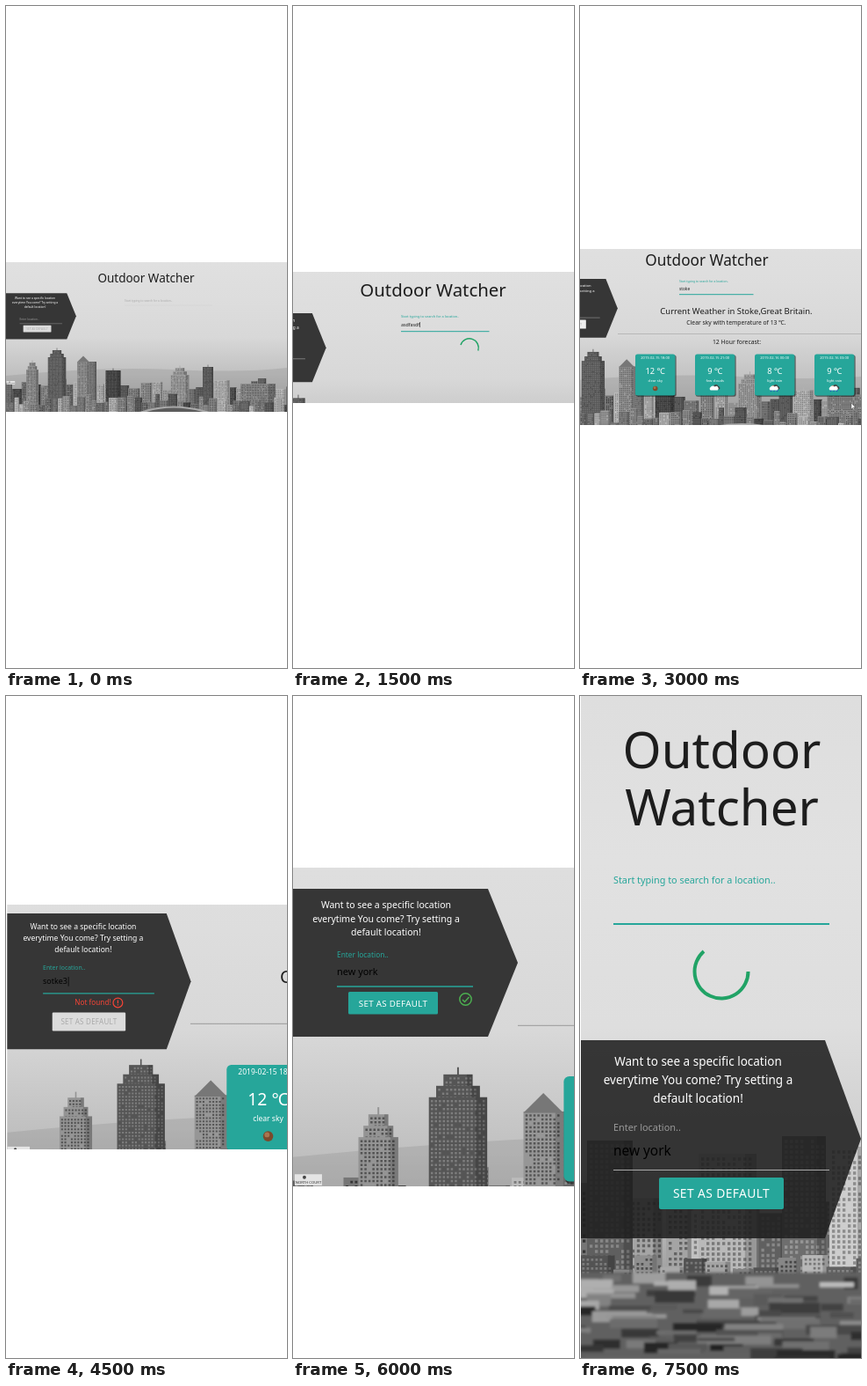
Recreate the animation shown at these times as an HTML page. Size 320 by 752 pixels, loop 9 s.

```html
<!DOCTYPE html>
<html lang="en">
<head>
<meta charset="utf-8">
<title>Outdoor Watcher</title>
<style>
  html, body { margin: 0; width: 100%; height: 100%; overflow: hidden; background: #fff; }
  #stage { display: block; width: 320px; height: 752px; font-family: "Noto Sans", "Open Sans", sans-serif; }
  .scene { opacity: 0; animation: show 9s step-end infinite; animation-delay: calc(var(--i) * 1.5s); }
  @keyframes show {
    0% { opacity: 1; }
    16.66667%, 100% { opacity: 0; }
  }
</style>
</head>
<body>
<svg id="stage" viewBox="0 0 320 752"></svg>
<script>
const TEAL = '#26a69a', GREEN = '#21a366', INK = '#1d1d1d';

let seed = 11;
const random = (min = 0, max = 1) => min + (max - min) * (seed = seed * 16807 % 2147483647) / 2147483647;

const rect = (x, y, w, h, fill, extra = '') =>
  `<rect x="${x}" y="${y}" width="${w}" height="${h}" fill="${fill}" ${extra}/>`;
const line = (x1, x2, y, color, width = 1) =>
  `<path d="M${x1} ${y}H${x2}" stroke="${color}" stroke-width="${width}"/>`;
const text = (x, y, size, fill, str, anchor = 'start', extra = '') =>
  `<text x="${x}" y="${y}" font-size="${size}" fill="${fill}" text-anchor="${anchor}" ${extra}>${str}</text>`;
const centered = (x, y, size, fill, str, extra) => text(x, y, size, fill, str, 'middle', extra);
const stroke = (d, color, width) =>
  `<path d="${d}" fill="none" stroke="${color}" stroke-width="${width}"/>`;
const ring = (x, y, r, color) =>
  `<circle cx="${x}" cy="${y}" r="${r}" fill="none" stroke="${color}" stroke-width="1.5"/>`;
const place = (x, y, scale, body) => `<g transform="translate(${x} ${y}) scale(${scale})">${body}</g>`;
const grey = v => `rgb(${v | 0},${v | 0},${v | 0})`;

// A block with rows of windows; unit is the window spacing.
function building(x, w, top, bottom, shade, unit) {
  let windows = '';
  for (let y = top + unit; y < bottom; y += unit)
    for (let wx = x + unit * .5; wx < x + w - unit * .6; wx += unit)
      if (random() < .85) windows += `M${wx.toFixed(2)} ${y.toFixed(2)}h${(unit * .55).toFixed(2)}`;
  const tone = shade > 115 ? shade - 65 : shade + 40;
  return rect(x, top, w, bottom - top, grey(shade)) +
    stroke(windows, grey(tone), unit * .55) +
    rect(x + w * .8, top, w * .2, bottom - top, '#000', 'opacity=".18"');
}

// Stepped tower: each tier is lower and wider than the one above it.
function tower(center, width, top, shade, tiers = 3) {
  let body = rect(center - .3, top - 2.5, .6, 3, grey(shade));
  for (let i = 0; i < tiers; i++) {
    const w = width * (i + 2) / (tiers + 1);
    body += building(center - w / 2, w, top + i * 4, 461, shade, 1.4);
  }
  return body;
}

function row(from, to, minWidth, maxWidth, minTop, maxTop, bottom, unit) {
  let body = '';
  for (let x = from; x < to;) {
    const w = random(minWidth, maxWidth);
    body += building(x, w, random(minTop, maxTop), bottom, random(50, 195), unit);
    x += w * random(.9, 1.15);
  }
  return body;
}

function skyline() {
  return rect(0, 280, 320, 181, 'url(#sky)') +
    '<path d="M0 420Q110 409 190 413T320 411V461H0Z" fill="#999" opacity=".4"/>' +
    row(0, 320, 7, 14, 422, 436, 461, 1.6) +
    tower(30, 14, 405, 148) + tower(58, 20.5, 391, 85) +
    building(92, 11, 404, 461, 105, 1.4) + building(81, 14, 404, 461, 150, 1.4) +
    '<path d="M81 404.500L88 397.500 95 404.500Z" fill="#777"/>' +
    tower(122, 17, 414, 60, 1) + tower(198, 21, 411, 160) + tower(230, 12, 410, 80, 1) +
    tower(246, 18, 425, 180, 1) + building(267, 40, 429, 461, 140, 1.5) +
    row(0, 320, 4, 11, 440, 455, 461, 1.6) +
    '<path d="M152 461Q190 448 232 461Z" fill="#aaa"/><path d="M160 461Q190 452 224 461Z" fill="#5c5c5c"/>' +
    rect(.6, 426, 9.6, 3.9, '#e4e4e4') + '<circle cx="4" cy="427.1" r=".6" fill="#444"/>' +
    centered(5.4, 429.4, 1.3, '#333', 'NORTH COURT');
}

const city = (scale, x, y) =>
  `<use href="#city" transform="translate(${x} ${y}) scale(${scale})"/>`;

const prompt = (x, y, leading, size) =>
  ['Want to see a specific location', 'everytime You come? Try setting a', 'default location!']
    .map((s, i) => centered(x, y + i * leading, size, '#fff', s)).join('');

// shift makes room for a message between the input and the button.
function panel({ value = '', accent = '#999', button = '#dcdcdc', caption = '#aaa', shift = 0, extra = '' }) {
  const bottom = 387 + shift;
  return `<path d="M-200 219H222L256 ${(219 + bottom) / 2} 222 ${bottom}H-200Z" fill="#363636"/>` +
    prompt(106, 241, 15.6, 10.5) +
    (value ? text(50, 297, 8.35, accent, 'Enter location..') + text(50, 317, 10.95, '#000', value)
           : text(50, 319, 10, '#999', 'Enter location..')) +
    line(50, 205, 330, accent, 1.5) +
    rect(63, 336 + shift, 102, 25.5, button, 'rx="1.5"') +
    centered(114, 352.5 + shift, 9.8, caption, 'SET AS DEFAULT', 'letter-spacing=".3"') + extra;
}

function icon(sky) {
  if (sky === 'clear sky')
    return '<circle cy="39" r="2.8" fill="#7b4a2c"/><circle cx="-.6" cy="38.2" r="1.4" fill="#a87550"/>';
  const rain = '<path d="M-3.500 40.500l-1 2M0 40.500l-1 2M3.500 40.500l-1 2" stroke="#2456b8" stroke-width="1.2"/>' +
    '<circle cx="-2" cy="37" r="1.6" fill="#d9642c"/>';
  return '<path d="M-2 40a2.500 2.500 0 0 1 1-4.500a3 3 0 0 1 5 1a2 2 0 0 1 1 3.500z" fill="#444"/>' +
    (sky === 'light rain' ? rain : '') +
    '<path d="M-5 41a2 2 0 0 1 0-3.500a3 3 0 0 1 5-.5a2.200 2.200 0 0 1 3 4z" fill="#fff"/>';
}

const card = (x, y, scale, date, temp, sky) => place(x, y, scale,
  rect(-22, 1, 46, 47.3, '#000', 'rx="2.5" opacity=".5"') +
  rect(-22.7, 0, 45.4, 47, TEAL, 'rx="2.5"') +
  centered(0, 5.5, 4.1, '#fff', `2019-02-${date}:00`) +
  centered(0, 22, 9.3, '#fff', temp + ' ℃') +
  centered(0, 31, 4.1, '#fff', sky) + icon(sky));

const firstCard = (x, y, scale) => card(x, y, scale, '15 18', 12, 'clear sky');
const title = (x, y, size) => centered(x, y, size, INK, 'Outdoor Watcher');
const search = (x, y, size, color) => text(x, y, size, color, 'Start typing to search for a location..');
const summary = (x, y, size, anchor) => text(x, y, size, INK, 'Current Weather in Stoke,Great Britain.', anchor);

function home() {
  return city(1, 0, 0) + title(159.5, 314, 13.5) + search(135, 336, 3.2, '#aaa') +
    line(135, 235, 340, '#ccc', .5) + place(0, 257.8, .312, panel({}));
}

function searching() {
  return city(1.51, -81.6, -145) + title(159.5, 330, 20.4) + search(123, 353.5, 3.9, TEAL) +
    text(123, 364, 5.3, INK, 'asdfasdf') + rect(144.3, 359, .6, 6, INK) + line(123, 223.5, 369.7, TEAL) +
    stroke('M191 385A10.300 10.300 0 0 1 210.800 391.500', GREEN, 1.5) +
    place(-81.6, 247, .466, panel({ button: '#eee' })) +
    stroke('M0 451Q4 448 8 451', '#666', 1);
}

function forecast() {
  const later = [['15 21', 9, 'few clouds'], ['16 00', 8, 'light rain'], ['16 03', 9, 'light rain']];
  return city(1.275, -59, -105.6) + title(144.5, 294.5, 17.2) + search(113, 314.3, 3.3, TEAL) +
    text(113, 323, 4.75, INK, 'stoke') + line(113, 197.5, 327.7, TEAL) +
    summary(178, 349.5, 9.46, 'middle') +
    centered(178, 362, 6.74, INK, 'Clear sky with temperature of 13 ℃.') +
    line(43, 320, 372.5, '#aaa', .7) +
    centered(178.5, 383.5, 6.8, INK, '12 Hour forecast:') +
    firstCard(85.7, 395.5, 1) +
    later.map((entry, i) => card(153.7 + i * 68, 395.5, 1, ...entry)).join('') +
    place(-58.5, 223.4, .396, panel({ button: '#eee' })) +
    '<path d="M309 451v7l1.500-1.500 1.200 2.500 1-.5-1.200-2.500h2z" fill="#fff" stroke="#333" stroke-width=".4"/>';
}

function notFound() {
  const red = '#f44336';
  const error = centered(119.5, 346, 10, red, 'Not found!') + ring(154.3, 343, 6.6, red) +
    stroke('M154.300 339.500v4.500m0 1.300v1.400', red, 1.5) + rect(85, 307, .9, 13, '#000');
  return city(2.65, 0, -617) + line(210, 320, 372.3, '#999') + summary(312, 326, 19.7) +
    firstCard(298.5, 419, 2.08) +
    place(1.2, 67.9, .818, panel({ value: 'sotke3', accent: TEAL, shift: 20.5, extra: error })) +
    rect(0, 237, 1.3, 278, '#fff');
}

function accepted() {
  const check = ring(196.5, 344.5, 6.7, '#4caf50') + stroke('M193 345l2.500 2.500 5-5.500', '#4caf50', 1.5);
  return city(3.24, 0, -837) + line(256, 320, 374.3, '#999') + firstCard(366, 432, 2.54) +
    panel({ value: 'new york', accent: TEAL, button: TEAL, caption: '#fff', extra: check });
}

// Blurred rooftops that grow wider and darker towards the viewer.
function rooftops() {
  let roofs = '';
  for (let y = 655; y < 750; y += 1.1) {
    const near = (y - 655) / 95;
    roofs += rect(random(-40, 310), y, random(14, 50) * (1 + near), random(4, 14),
      grey(random(35, 215 - near * 105)));
  }
  return `<g filter="url(#soft)">${rect(-10, 655, 340, 110, '#606060')}${roofs}</g>`;
}

function mobile() {
  return rect(0, 0, 320, 752, 'url(#tallSky)') +
    row(0, 320, 25, 50, 530, 600, 670, 6) +
    building(8, 52, 505, 670, 95, 6) + building(135, 66, 520, 670, 185, 6) +
    building(230, 50, 500, 670, 110, 6) + building(284, 40, 512, 670, 205, 6) +
    row(0, 320, 20, 40, 632, 655, 680, 5) + rooftops() +
    centered(161.5, 82, 56.5, INK, 'Outdoor') + centered(161.5, 147, 56.5, INK, 'Watcher') +
    search(38, 213, 10.84, TEAL) + line(38, 284, 259, TEAL, 2) +
    stroke('M141 290A30.500 30.500 0 1 0 191.500 313', GREEN, 4) +
    '<path d="M0 391H279L320 503 279 616H0Z" fill="#1f1f1f" opacity=".88"/>' +
    prompt(134.5, 419.5, 21, 13.5) +
    text(38, 494, 10.9, '#999', 'Enter location..') + text(38, 522, 15.4, '#000', 'new york') +
    line(38, 284, 538.5, '#aaa') + rect(90, 547, 142, 36, TEAL, 'rx="2"') +
    centered(161, 570, 13.8, '#fff', 'SET AS DEFAULT', 'letter-spacing=".4"') +
    rect(0, 0, 1, 752, '#fff');
}

const gradient = (id, y1, y2, shades) =>
  `<linearGradient id="${id}" gradientUnits="userSpaceOnUse" x1="0" x2="0" y1="${y1}" y2="${y2}">` +
  shades.map((v, i) => `<stop offset="${i / (shades.length - 1)}" stop-color="${grey(v)}"/>`).join('') +
  '</linearGradient>';

// Each scene fills a band of the stage, centred vertically.
const scenes = [[home, 170], [searching, 149], [forecast, 200], [notFound, 278], [accepted, 362], [mobile, 752]];

document.getElementById('stage').innerHTML = '<defs>' +
  gradient('sky', 291, 461, [224, 221, 216, 192, 150]) +
  gradient('tallSky', 0, 752, [222, 225, 222, 200, 120]) +
  '<filter id="soft"><feGaussianBlur stdDeviation="1.8"/></filter>' +
  `<g id="city">${skyline()}</g></defs>` +
  scenes.map(([draw, height], i) => {
    const top = Math.ceil((752 - height) / 2);
    return `<g class="scene" style="--i:${i}"><svg x="0" y="${top}" width="320" height="${height}" ` +
      `viewBox="0 ${top} 320 ${height}">${draw()}</svg></g>`;
  }).join('');
</script>
</body>
</html>
```
